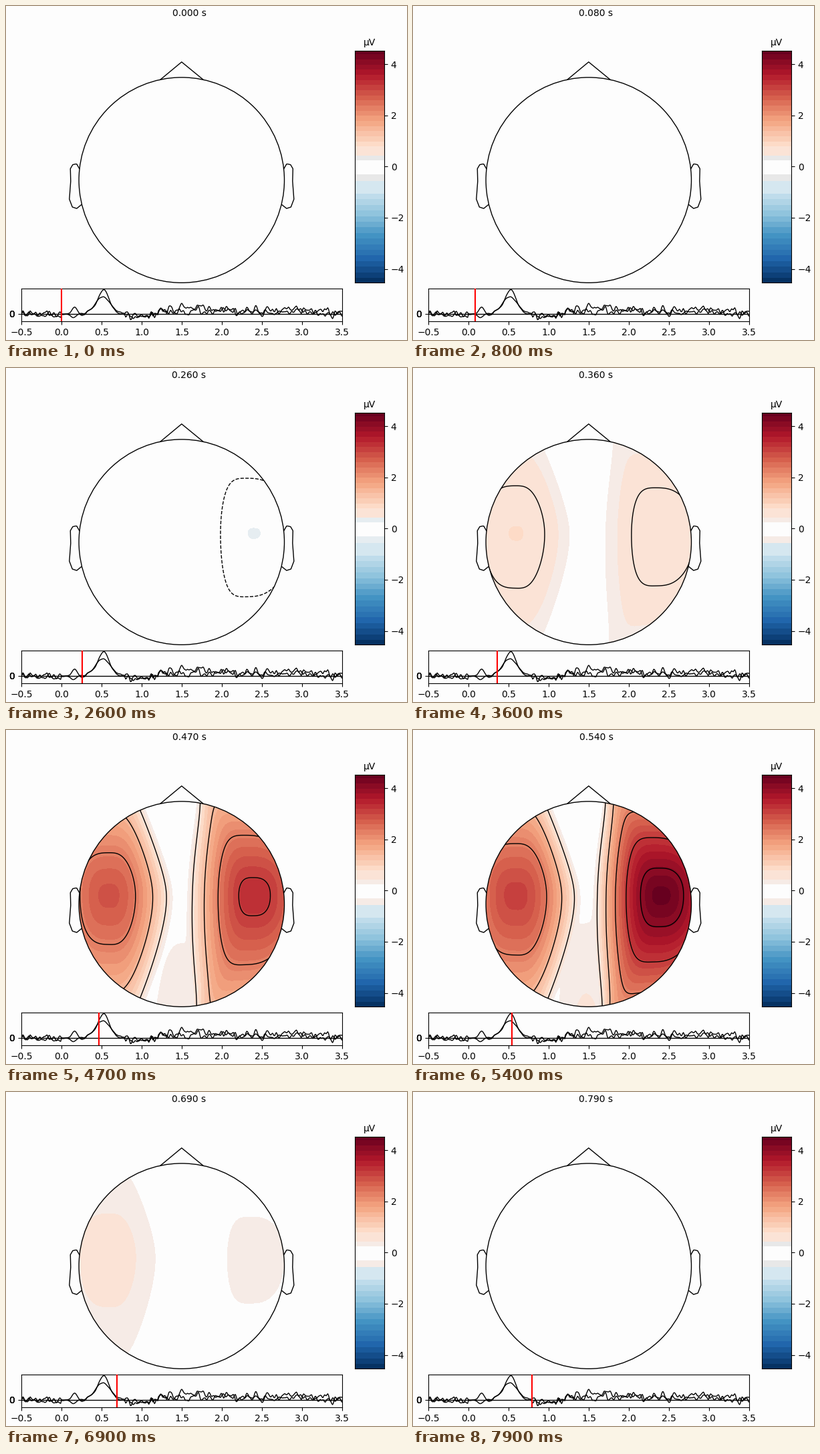
Animation, 600 px wide and 500 px high, one loop 8000 ms. Source, as a matplotlib script:

```python
import numpy as np
import matplotlib.pyplot as plt
from matplotlib.animation import FuncAnimation
from matplotlib.colors import BoundaryNorm, ListedColormap, to_rgba
from matplotlib.patches import Circle

W, H, FRAMES, STEP = 600, 500, 80, 100
CX, CY, RAD = 262.8, 260.6, 153.7
VMAX = 4.53
PAPER = "#fdfdfd"
LEVELS = np.arange(-0.22, VMAX, 0.85)

plt.rcParams.update({"font.family": "DejaVu Sans", "font.size": 10})
fig = plt.figure(figsize=(W / 100, H / 100), dpi=100, facecolor=PAPER)


def pixel_axes(x0, y0, x1, y1):
    """Axes placed by pixel corners, y counted downwards."""
    return fig.add_axes([x0 / W, 1 - y1 / H, (x1 - x0) / W, (y1 - y0) / H],
                        facecolor=PAPER)


# ---- sensor signals in microvolts, 100 samples per second ----
times = np.linspace(-0.5, 3.5, 401)
rng = np.random.default_rng(4)


def signal(drift, *waves):
    """Gaussian waves (time, height, width) over drift and smooth noise."""
    kernel = np.hanning(7) / np.hanning(7).sum()
    noise = np.convolve(rng.normal(0, 0.75, times.size), kernel, "same")
    shown = (times > -0.005) & (times < 0.795)
    y = np.where(shown, 0.15, 1) * noise + drift * (times > 1.2)
    for t, height, width in waves:
        y += height * np.exp(-((times - t) / width) ** 2 / 2)
    return y


left = signal(0.35, (0.145, -0.73, 0.035), (0.515, 3.15, 0.095),
              (1.0, -0.4, 0.12))
right = signal(0.4, (0.165, 1.28, 0.03), (0.26, -0.45, 0.03),
               (0.36, 0.52, 0.05), (0.525, 4.5, 0.07), (1.0, -0.5, 0.12),
               (1.7, 0.9, 0.25), (2.9, 0.6, 0.15))

# ---- scalp field of one unit of each sensor ----
gx, gy = np.meshgrid(np.arange(109, 418), np.arange(106, 416))
inside = np.hypot(gx - CX, gy - CY) < RAD
dy = gy - 247.5
depth = np.where(dy < 0, -dy, dy / 1.15)


def lobe(dx, inner, outer):
    """Squarish cosine bump; dx is positive towards the midline."""
    across = np.pi / 2 * np.abs(dx) / np.where(dx > 0, inner, outer)
    along = np.pi / 2 * (depth / 227) ** 0.72
    bump = np.cos(np.minimum(np.cbrt(across ** 3 + along ** 3), np.pi))
    return (bump + np.hypot(bump, 0.04)) / 2


taper = 0.3 * (np.hypot(depth, 30) - 30)
shift = 35 * (depth / 128) ** 2.5
midline = (0.035 + 0.00025 * (gy - 306)) * np.exp(-((gx - 258) / 50) ** 2)
left_lobe = lobe(gx - 154, 97 - taper, 108) + midline
right_lobe = lobe(370 - shift - gx, 101 - 1.1 * shift, 120) + midline

# ---- colour bands ----
edges = np.concatenate([np.arange(-4.57, -1, 0.22), [-0.56, -0.3, 0.25, 0.44],
                        np.arange(0.8, 4.7, 0.2)])
norm = BoundaryNorm(edges, len(edges) - 1)
mids = (edges[1:] + edges[:-1]) / 2
zero = int(np.searchsorted(edges, 0)) - 1


def banded(tint):
    colors = plt.get_cmap("RdBu_r")(0.5 + mids / (2 * VMAX))
    colors[[zero - 1, zero + 1]] = to_rgba(tint)
    colors[zero] = to_rgba(PAPER)
    return ListedColormap(colors)


GRAY, BLUE, PINK = map(banded, ("#e8e8e8", "#e6edf1", "#f6ebe6"))

# ---- head ----
stage = pixel_axes(0, 0, W, H)
stage.axis("off")
field = stage.imshow(np.zeros(gx.shape), cmap=GRAY, norm=norm, aspect="auto",
                     extent=(108.5, 417.5, 415.5, 105.5),
                     interpolation="nearest")
stage.set(xlim=(0, W), ylim=(H, 0))
rim = Circle((CX, CY), RAD, fill=False, lw=1, ec="k", zorder=5)
stage.add_patch(rim)
field.set_clip_path(rim)

stage.plot([231, CX, 295], [110.2, 83.8, 110.2], "k", lw=1)
ear_x = np.array([153, 157, 159, 163, 166.5, 166, 168, 163.5, 157, 150])
ear_y = np.array([-17, -24, -24, -23, -17, 1.7, 28.6, 40.4, 42.5, 36.9])
for side in (-1, 1):
    stage.plot(CX + side * ear_x, CY + ear_y, "k", lw=1)

clock = stage.text(299.5, 11.2, "", ha="right", va="center")
stage.text(543.5, 55, "µV", ha="center", va="center")

# ---- colour bar ----
bar_ax = pixel_axes(522, 67, 566, 413.8)
ramp = np.linspace(-VMAX, VMAX, 694)[:, None]
bar = bar_ax.imshow(ramp, cmap=GRAY, norm=norm, aspect="auto", origin="lower",
                    extent=(0, 1, -VMAX, VMAX), interpolation="nearest")
bar_ax.set_xticks([])
bar_ax.yaxis.tick_right()
bar_ax.set_yticks(range(-4, 5, 2))

# ---- signal strip ----
strip = pixel_axes(23, 423, 503, 472)
for y in (left, right):
    strip.plot(times, y, "k", lw=1)
strip.axhline(0, color="k", lw=1)
cursor = strip.axvline(0, color="r", lw=1.5, zorder=4)
strip.set(xlim=(-0.5, 3.5), ylim=(-1.41, 4.75), yticks=[0])
strip.set_yticklabels(["0"])
strip.set_xticks(np.arange(-0.5, 3.6, 0.5))
for _ in range(2):
    stage.text(13.1, 461, "0", ha="right", va="center_baseline")

lines = []


def draw(i):
    t = i / 100
    a, b = left[50 + i], right[50 + i]
    z = a * left_lobe + b * right_lobe
    tint = BLUE if min(a, b) < -0.3 else PINK if max(a, b) > 0.3 else GRAY
    field.set_data(z)
    field.set_cmap(tint)
    bar.set_cmap(tint)

    while lines:
        lines.pop().remove()
    lo, hi = z[inside].min(), z[inside].max()
    shown = [v for v in LEVELS if lo < v < hi]
    if shown:
        rings = stage.contour(gx, gy, z, shown, colors="k", linewidths=1)
        rings.set_clip_path(rim)
        lines.append(rings)
        stage.set(xlim=(0, W), ylim=(H, 0))

    clock.set_text(f"{t:.3f} s")
    cursor.set_xdata([t, t])
    return []


anim = FuncAnimation(fig, draw, frames=FRAMES, interval=STEP, repeat=True,
                     repeat_delay=0, init_func=lambda: draw(0))
plt.show()
```
